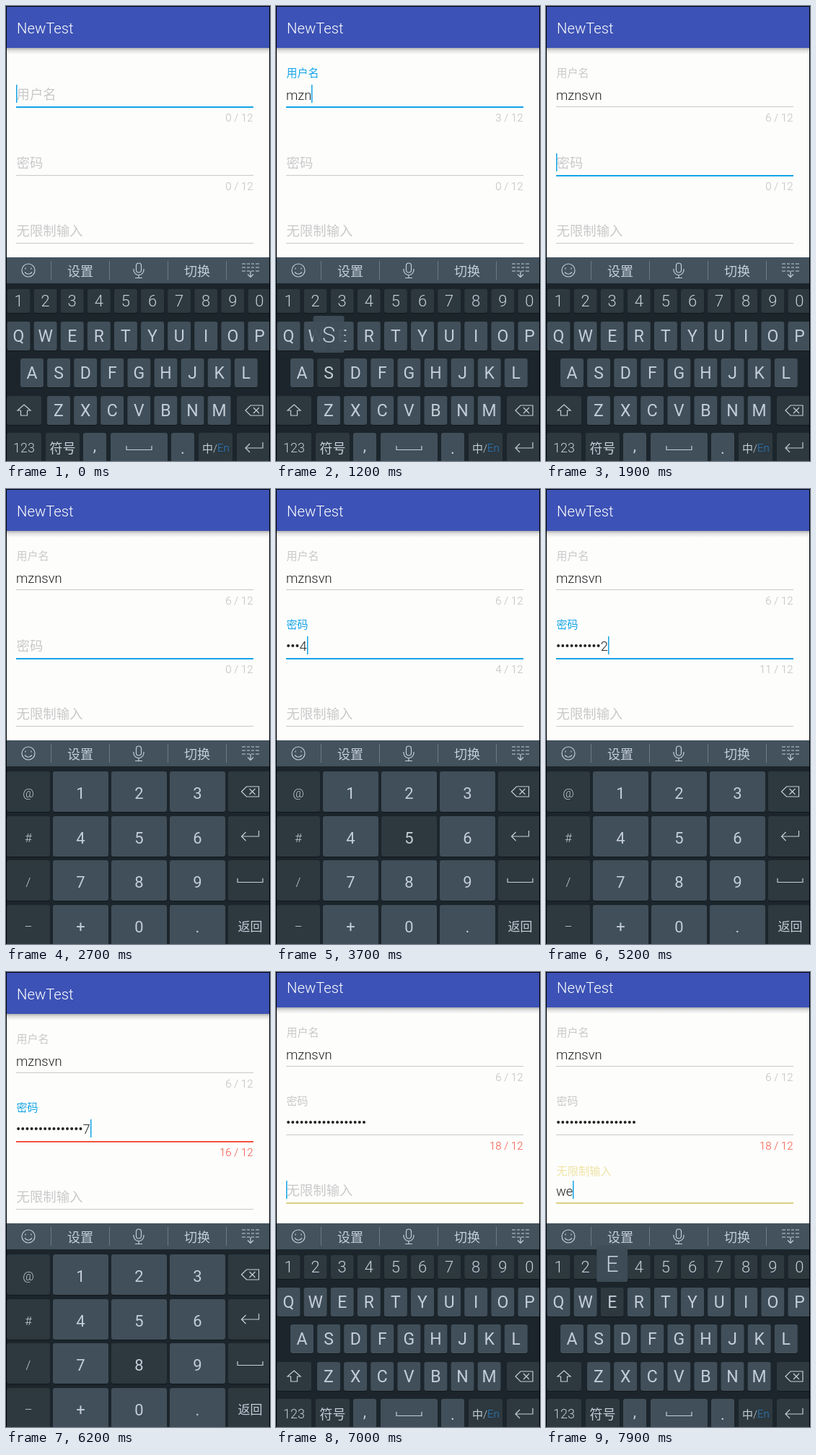
An HTML page with a canvas for the animation above (8000 ms loop, 366 by 630 pixels).

```html
<!DOCTYPE html>
<html lang="zh">
<head>
<meta charset="utf-8">
<title>NewTest</title>
<style>
html, body { margin: 0; width: 366px; height: 630px; overflow: hidden; background: #000; }
canvas { display: block; }
</style>
</head>
<body>
<canvas id="stage" width="366" height="630"></canvas>
<script>
const ctx = document.getElementById('stage').getContext('2d');
const LOOP = 8000, STEP = 100;
const BLUE = '#12a4e6', RED = '#f4523f', YELLOW = '#ddd083', GREY = '#c9c9c9', INK = '#222';
const KEY = '#414f5a', DARK = '#2d383f', KEY_TEXT = '#c3ced8';

// One stroke: character, press time, time it appears, release time
const strokes = (chars, times) => [...chars].map((ch, i) => {
  const [press, typed, release = typed] = times[i];
  return { ch, press, typed, release };
});

const fields = [
  { hint: '用户名', color: BLUE, limit: 12, strokes: strokes('mznsvn',
    [[100, 300], [500, 600], [700, 800], [1200, 1300], [1400, 1500], [1600, 1700]]) },
  { hint: '密码', color: BLUE, limit: 12, secret: true, strokes: strokes('123456789123456789',
    [[2900, 3000], [3000, 3200], [3200, 3300], [3500, 3600], [3700, 3800], [3800, 3900],
     [4200, 4300], [4400, 4500], [4500, 4600], [4900, 5000], [5100, 5200], [5400, 5500],
     [5600, 5700], [5700, 5800], [5900, 6000], [6000, 6100], [6200, 6300], [6500, 6800, 7000]]) },
  { hint: '无限制输入', color: YELLOW, label: '#efe3a4', strokes: strokes('we',
    [[7700, 7700, 7900], [7900, 7900, 8000]]) }
];
const allStrokes = fields.flatMap(f => f.strokes);
const cursorOff = [[100, 300], [2500, 2900], [7300, 7700]];
const within = (t, a, b) => t >= a && t < b;

function text(s, x, cy, size, color, align = 'left', weight = 300) {
  const cjk = /[\u4e00-\u9fff]/.test(s);
  ctx.font = `${cjk ? 300 : weight} ${size}px Roboto, "Noto Sans CJK SC", "Noto Sans CJK", sans-serif`;
  ctx.textAlign = align;
  ctx.fillStyle = color;
  ctx.fillText(s, x, cy + size * (cjk ? 0.38 : 0.36));
  return ctx.measureText(s).width;
}

function rect(x, y, w, h, color) {
  ctx.fillStyle = color;
  ctx.fillRect(x, y, w, h);
}

function round(x, y, w, h, r, color) {
  ctx.beginPath();
  ctx.roundRect(x, y, w, h, r);
  ctx.fillStyle = color;
  ctx.fill();
}

// Icon outlines, drawn around their own centre
const icons = {
  smile: 'M9 0A9 9 0 1 1-9 0A9 9 0 1 1 9 0M-4-3.5v2M4-3.5v2M-5 2.5Q0 8 5 2.5',
  mic: 'M-3.5-6.5a3.5 3.5 0 0 1 7 0v6a3.5 3.5 0 0 1-7 0zM-7-2v1.5a7 7 0 0 0 14 0V-2M0 7v3.5M-5 10.5H5',
  hide: 'M-12-9h5m2 0h4m2 0h4m2 0h5M-12-4h5m2 0h4m2 0h4m2 0h5M-12 1h5m2 0h4m2 0h4m2 0h5M0 1v8M-4 5.5L0 9.5L4 5.5',
  shift: 'M0-8L9 0H4.5V7H-4.5V0H-9Z',
  back: 'M-12 0L-5-7H12V7H-5ZM-1-4L7 4M7-4L-1 4',
  enter: 'M12-8V0H-12M-6-6L-12 0L-6 6',
  space: 'M-17.5-3V2.5H17.5V-3'
};
for (const name in icons) icons[name] = new Path2D(icons[name]);

function icon(name, x, y) {
  ctx.save();
  ctx.translate(x, y);
  ctx.strokeStyle = KEY_TEXT;
  ctx.lineWidth = 1.2;
  ctx.stroke(icons[name]);
  ctx.restore();
}

const key = (label, x, y, w, h, size, dark, drop = 0) => ({ label, x, y, w, h, size, dark, drop });
const row = (chars, cx, y, h, size, dark) =>
  [...chars].map((ch, i) => key(ch, cx - 16 + 37.1 * i, y, 32, h, size, dark));

const letterKeys = [
  ...row('1234567890', 17.5, 392, 33, 22, true),
  ...row('QWERTYUIOP', 17.5, 437, 40, 23),
  ...row('ASDFGHJKL', 36, 488, 40, 23),
  ...row('ZXCVBNM', 73, 540, 40, 23),
  key('shift', 1, 540, 48, 40, 0, true),
  key('back', 320, 540, 48, 40, 0, true),
  key('123', 1, 591, 48, 42, 18, true),
  key('符号', 55, 591, 47, 42, 18, true),
  key(',', 107, 591, 32, 42, 22, false, -4),
  key('space', 145, 591, 79, 42, 0),
  key('.', 229, 591, 32, 42, 22),
  key('中/', 267, 591, 47, 42, 15, true),
  key('enter', 320, 591, 48, 42, 0, true)
];

const padRows = [['@', '1', '2', '3', 'back'], ['#', '4', '5', '6', 'enter'],
  ['/', '7', '8', '9', 'space'], ['–', '+', '0', '.', '返回']];
const padKeys = padRows.flatMap((labels, r) => labels.map((label, c) => {
  const side = c % 4 === 0;
  return key(label, [1, 65, 146, 227, 308][c], 391 + Math.round(61.6 * r),
    [60, 77, 77, 77, 61][c], 56, side ? 17 : 22, side, 2);
}));

function drawKey(k, pressed) {
  const cx = k.x + k.w / 2, cy = k.y + k.h / 2;
  round(k.x, k.y + 1, k.w, k.h, 3, '#10171b');
  round(k.x, k.y, k.w, k.h, 3, k.dark || pressed ? DARK : KEY);
  if (icons[k.label]) icon(k.label, Math.min(cx, k.w > 60 ? 338.5 : 344), cy);
  else if (k.label === '中/') {
    const w = text(k.label, 272, cy, k.size, KEY_TEXT);
    text('En', 272 + w, cy, k.size, '#2b7fc6');
  } else {
    text(k.label, cx, cy + k.drop, k.size, KEY_TEXT, 'center', k.dark ? 300 : 400);
  }
}

function drawPopup(k) {
  const cx = k.x + k.w / 2;
  ctx.globalAlpha = 0.93;
  round(cx - 21.5, k.y - 59, 43, 51, 3, '#3f4e59');
  ctx.globalAlpha = 1;
  text(k.label, cx, k.y - 33.5, 31, KEY_TEXT, 'center');
}

function drawKeyboard(t) {
  rect(0, 348, 366, 36, '#43525d');
  rect(0, 384, 366, 246, '#1b252b');
  for (let x = 62; x < 320; x += 81) rect(x, 353, 1, 26, '#6d7a84');
  icon('smile', 31, 366);
  text('设置', 103, 367, 18, KEY_TEXT, 'center');
  icon('mic', 184, 366);
  text('切换', 265, 367, 18, KEY_TEXT, 'center');
  icon('hide', 339, 366);

  const pad = within(t, 2700, 7000);
  const held = allStrokes.find(s => within(t, s.press, s.release));
  const label = held && held.ch.toUpperCase();
  const keys = pad ? padKeys : letterKeys;
  keys.forEach(k => drawKey(k, k.label === label));
  if (held && !pad) drawPopup(keys.find(k => k.label === label));
}

function drawField(f, i, t, focused) {
  const top = 94.5 * i, line = 139 + Math.round(top), middle = 123 + Math.floor(top);
  const typed = f.strokes.filter(s => t >= s.typed);
  const n = typed.length, over = n > f.limit;

  // Hint floats up from the input line once something is typed
  const p = Math.max(0, Math.min(1, (t - f.strokes[0].press - (i ? 0 : 200)) / 280));
  const rise = 1 - (1 - p) ** 2;
  const labelColor = focused && rise > 0 ? f.label || f.color : GREY;
  text(f.hint, 14.5, 122.5 + top - 30 * rise, 18.4 - 3.4 * rise, labelColor);

  let end = 14;
  if (f.secret) {
    const dots = focused ? Math.max(0, n - 1) : n;
    for (let d = 0; d < dots; d++) round(15.1 + 6.17 * d, 120.5 + top, 4, 4, 2, INK);
    end += 6.17 * dots;
    if (dots < n) end += text(typed[n - 1].ch, end, middle, 18.4, INK);
  } else {
    end += text(typed.map(s => s.ch).join(''), 14, middle, 18.4, INK);
  }

  if (focused && !cursorOff.some(([a, b]) => within(t, a, b))) {
    rect(Math.round(end), Math.round(109 + top), 1.5, 25, BLUE);
  }
  if (focused) rect(14, line, 329, 2, over ? RED : f.color);
  else rect(14, line, 329, 1, GREY);
  if (f.limit) text(`${n} / ${f.limit}`, 342.5, 155 + top, 15, over ? RED : '#bdbdbd', 'right');
}

function draw(t) {
  const focus = t < 1900 ? 0 : t < 6800 ? 1 : 2;
  rect(0, 0, 366, 630, '#fdfdfc');
  ctx.save();
  ctx.translate(0, t < 6800 ? 0 : t < 7000 ? -1 : -9);
  const shade = ctx.createLinearGradient(0, 58, 0, 67);
  shade.addColorStop(0, '#b0b0b0');
  shade.addColorStop(0.4, '#e0e0e0');
  shade.addColorStop(1, '#fdfdfc');
  rect(0, 58, 366, 9, shade);
  rect(0, 0, 366, 58, '#3c52b6');
  text('NewTest', 15, 31, 20.3, '#fff');
  fields.forEach((f, i) => drawField(f, i, t, i === focus));
  ctx.restore();
  drawKeyboard(t);
  rect(0, 0, 366, 1, '#000');
  rect(0, 0, 1, 630, '#000');
  rect(365, 0, 1, 630, '#000');
}

const start = performance.now();
function frame() {
  const t = (performance.now() - start) % LOOP;
  draw(Math.floor(t / STEP) * STEP);
  requestAnimationFrame(frame);
}
frame();
</script>
</body>
</html>
```
